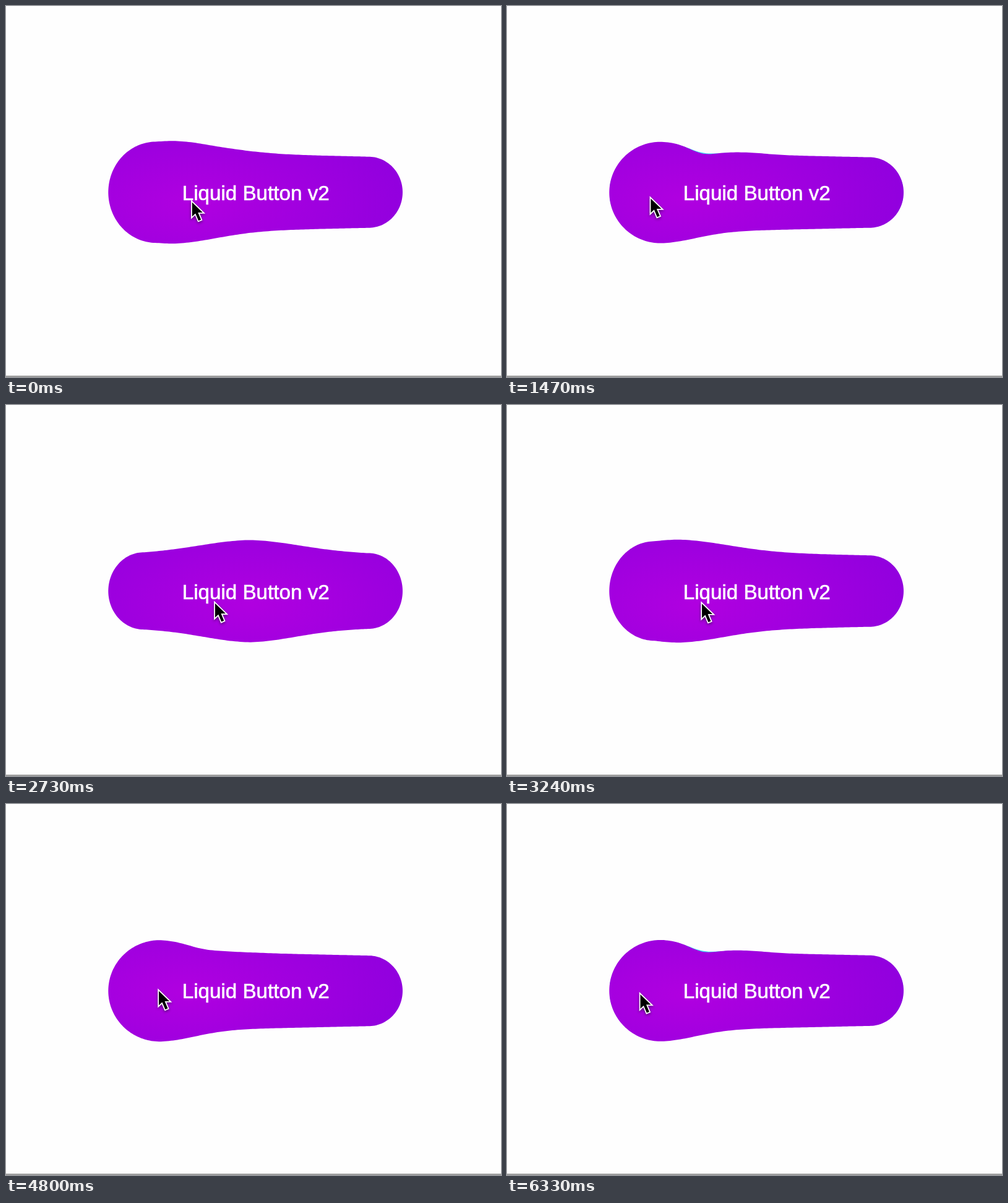
Animation, 800 px wide and 600 px high, one loop 6.36 s. Source, as an HTML page with a canvas:

```html
<!DOCTYPE html>
<html>
<head>
<meta charset="utf-8">
<style>
html, body { margin: 0; width: 100%; height: 100%; overflow: hidden; background: #fefefe; }
canvas { display: block; }
</style>
</head>
<body>
<canvas id="stage" width="800" height="600"></canvas>
<script>
const ctx = document.getElementById('stage').getContext('2d');
const LOOP = 6360, STEP = 30;
const LEFT = 248, RIGHT = 558;

// turning points of the pointer: time, x, y
const turns = [
  [-900, 590, 292], [-240, 247, 318.4], [690, 586.4, 290], [1440, 230, 308],
  [2200, 591, 295], [3000, 249.6, 325], [3840, 592, 288], [4700, 233.4, 299.8],
  [5545, 603.4, 277.4], [6330, 214.5, 304.5], [7200, 590, 290]
];

const clamp = (v, lo, hi) => Math.max(lo, Math.min(hi, v));
const bell = (d, w) => Math.exp(-((d / w) ** 2));

function pointer(t) {
  const i = turns.findIndex(k => k[0] > t);
  const [t0, x0, y0] = turns[i - 1], [t1, x1, y1] = turns[i];
  const e = (1 - Math.cos(Math.PI * (t - t0) / (t1 - t0))) / 2;
  return { x: x0 + (x1 - x0) * e, y: y0 + (y1 - y0) * e };
}

function liquid(t) {
  const mouse = pointer(t);
  const peak = clamp(pointer(t - 90).x, LEFT, RIGHT);
  const late = clamp(pointer(t - 250).x, LEFT, RIGHT);
  const free = clamp(Math.min(peak - LEFT, RIGHT - peak) / 25, 0, 1);
  return {
    mouse, peak, free,
    cy: 302.4 - Math.max(0, mouse.y - 296) * 0.065,
    swell: 25 + 1.5 * free - 1.8 * (peak - LEFT) / (RIGHT - LEFT),
    ripple: clamp(Math.abs(late - peak) / 50, 0, 1) * (1 - free),
    onLeft: peak < 400,
    x0: 165.3,
    x1: 641 + Math.max(0, mouse.x - 592) * 0.35,
    capL: 57 + 26 * bell(peak - LEFT, 40),
    capR: 55 + 26 * bell(peak - RIGHT, 40)
  };
}

// half height of the body at x, on its upper or lower side
function halfHeight(s, x, top, dip) {
  const u = Math.max(0, 1 - (x - s.x0) / s.capL, 1 - (s.x1 - x) / s.capR);
  x = clamp(x, s.x0 + s.capL, s.x1 - s.capR);
  const d = Math.abs(x - s.peak);
  const outer = s.free < 1 && (s.onLeft ? x < s.peak : x > s.peak);
  const w = outer ? 130 : top ? 70 + 45 * s.free : 80 + 25 * s.free;
  let h = 57 + s.swell * (0.7 * bell(d, w) + 0.3 * Math.max(0, 1 - d / 340));
  if (!outer && (top || !s.onLeft)) {
    const depth = s.onLeft ? 7 * dip : 2;
    h += s.ripple * (3 * bell(d - 140, 45) - depth * bell(d - 68, 28));
  }
  return h * Math.sqrt(Math.max(0, 1 - u * u));
}

function outline(s, inset, dip) {
  const n = 180, mid = (s.x0 + s.x1) / 2, half = (s.x1 - s.x0) / 2;
  ctx.beginPath();
  for (let i = 0; i <= 2 * n; i++) {
    const a = Math.PI * i / n, top = i <= n;
    const x = mid - half * Math.cos(a);
    const h = Math.max(0, halfHeight(s, x, top, dip) - inset);
    ctx.lineTo(clamp(x, s.x0 + inset, s.x1 - inset), s.cy + (top ? -h : h));
  }
  ctx.closePath();
}

function drawBody(s) {
  if (s.onLeft && s.ripple > 0.5) {
    outline(s, 0.8, 0.7);
    ctx.fillStyle = '#3cdcf5';
    ctx.fill();
  }
  outline(s, 0, 1);
  const light = ctx.createRadialGradient(0, 0, 0, 0, 0, 420);
  light.addColorStop(0, '#b000e0');
  light.addColorStop(1, '#8c00de');
  ctx.save();
  ctx.translate(s.peak * 0.75 + 100, s.mouse.y + 5);
  ctx.scale(1, 0.45);
  ctx.fillStyle = light;
  ctx.fill();
  ctx.restore();
}

function drawLabel() {
  ctx.font = '33.2px "Liberation Sans", Arial, sans-serif';
  ctx.textAlign = 'center';
  ctx.fillStyle = ctx.strokeStyle = '#fff';
  ctx.lineWidth = 0.7;
  ctx.fillText('Liquid Button v2', 403.7, 314.3);
  ctx.strokeText('Liquid Button v2', 403.7, 314.3);
}

function drawPointer({ x, y }) {
  ctx.save();
  ctx.translate(x, y);
  ctx.beginPath();
  [[1, 3.5], [1, 26.5], [6.4, 21.4], [11.4, 33.2], [15.4, 31.5], [10.5, 20], [18, 20]]
    .forEach(p => ctx.lineTo(...p));
  ctx.closePath();
  ctx.shadowColor = 'rgba(0,0,0,.45)';
  ctx.shadowBlur = 4;
  ctx.shadowOffsetY = 2;
  ctx.strokeStyle = '#fff';
  ctx.lineWidth = 3.6;
  ctx.stroke();
  ctx.shadowColor = 'transparent';
  ctx.fillStyle = '#000';
  ctx.fill();
  ctx.restore();
}

function draw(t) {
  ctx.fillStyle = '#fefefe';
  ctx.fillRect(0, 0, 800, 600);
  ctx.fillStyle = '#777';
  ctx.fillRect(0, 598, 800, 1.5);
  const s = liquid(t);
  drawBody(s);
  drawLabel();
  drawPointer(s.mouse);
}

const start = performance.now();
function frame() {
  const t = (performance.now() - start) % LOOP;
  draw(Math.floor(t / STEP) * STEP);
  requestAnimationFrame(frame);
}
frame();
</script>
</body>
</html>
```
